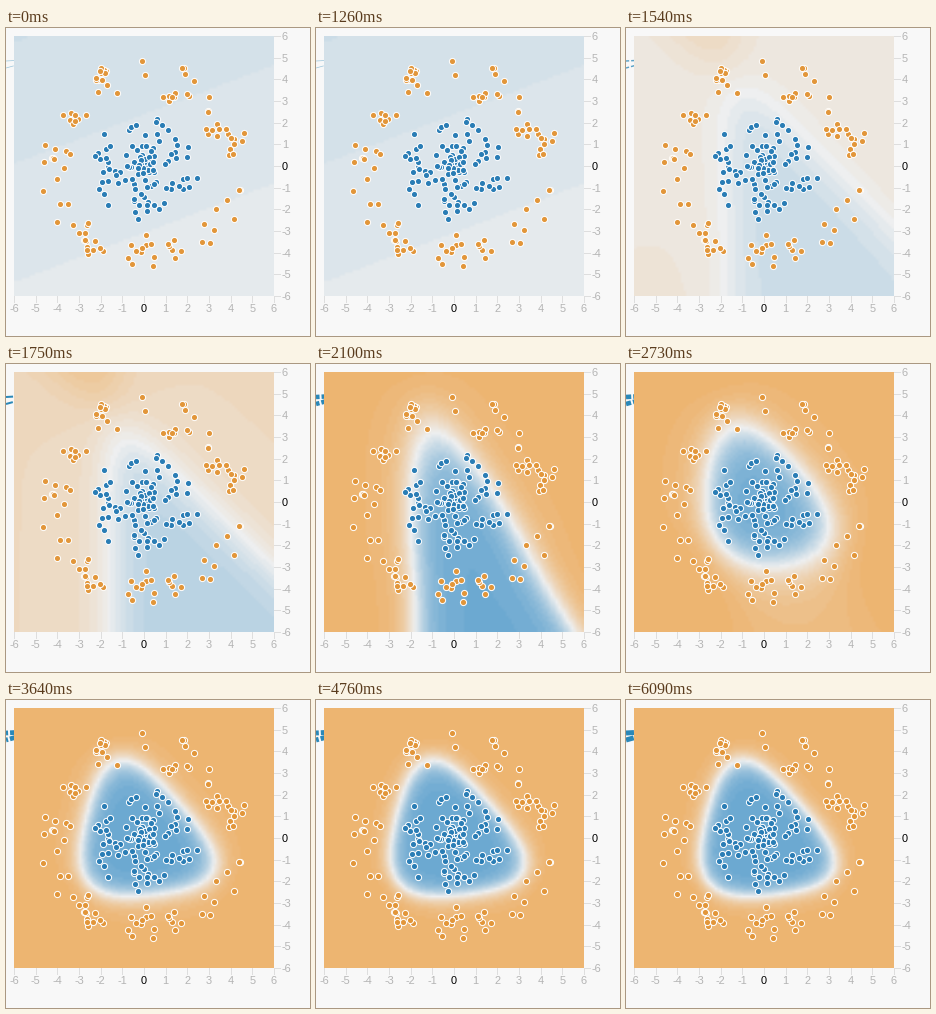
Write a matplotlib script that moves like this. It is 304 px wide and 308 px high and loops after 7.07 s.

```python
import numpy as np
import matplotlib.pyplot as plt
from matplotlib.animation import FuncAnimation

plt.rcParams["font.family"] = "Liberation Sans"
plt.rcParams["lines.scale_dashes"] = False

W, H, DPI = 304, 308, 80
PT = 72 / DPI  # points per pixel
FRAMES, STEP = 101, 70
LEFT = TOP = 8
SIDE = 260
RIGHT, BOTTOM = LEFT + SIDE, TOP + SIDE
UNIT = SIDE / 12
CENTRE = LEFT + SIDE / 2

ORANGE, PALE, BLUE = (237, 181, 113), (238, 239, 240), (108, 169, 209)
DOT_ORANGE, DOT_BLUE, LINK = "#e2963a", "#2a7db5", "#2a88b8"

# Training milestones in ms: start, first wedge, sharp wedge, closed blob, end.
START, WEDGE, SHARP, CLOSED, END = 1260, 1750, 2100, 2730, 5040

axis = (np.arange(100) + 0.5) * 0.12 - 6
X, Y = np.meshgrid(axis, -axis)
SHADES = np.array([
    np.interp(np.linspace(0, 1, 31), [0, 0.5, 1], channel)
    for channel in zip(ORANGE, PALE, BLUE)
]).T.astype(np.uint8)


def ramp(t, start, end, a=0, b=1):
    return np.interp(t, [start, end], [a, b])


def wall(degrees, distance, sharpness):
    """Hidden neuron: +1 inside a straight wall, -1 beyond it."""
    angle = np.radians(degrees)
    return np.tanh(sharpness * (X * np.cos(angle) + Y * np.sin(angle)
                                + distance))


def heatmap(t):
    """Three walls enclose the core; the floor joins after the two sides."""
    stages = [WEDGE, SHARP, CLOSED]
    sides = np.interp(t, [START, *stages[:2], END], [0, 0.4, 2.2, 3.2])
    floor = sides * ramp(t, 2030, 2900)
    sharpness = np.interp(t, [*stages, 3640], [0.8, 0.55, 0.5, 0.67])

    left = wall(ramp(t, SHARP, 3640, 0, -13),
                ramp(t, WEDGE, CLOSED, 1.55, 2.65), sharpness)
    right = wall(np.interp(t, stages, [226, 212, 221]),
                 np.interp(t, stages, [1.95, 1.7, 2.1]), sharpness)
    bottom = wall(96, 2.5, sharpness)

    untrained = 0.134 + 0.012 * (Y - 0.38 * X)
    total = (untrained * ramp(t, START, WEDGE, 1, 0)
             + sides * (left + right) + floor * bottom
             - 0.93 * (sides + floor))
    level = (np.tanh(total) + 1) / 2
    return SHADES[np.clip((level * 31).astype(int), 0, 30)]


def polar(rng, count, inner, outer):
    radius = rng.uniform(inner, outer, count)
    angle = rng.uniform(0, 2 * np.pi, count)
    return np.c_[radius * np.cos(angle), radius * np.sin(angle)]


def ring_points(rng):
    """Outer class: an even ring with a few crowded spots."""
    crowded = [(-2, 4.2), (2, 3.3), (3.4, 1.7), (-2.7, -3.6), (-4, 0.4),
               (-3.2, 2.2), (0, -3.75)]
    clumps = [rng.normal(spot, (0.45, 0.25), (8, 2)) for spot in crowded]
    return np.vstack([polar(rng, 54, 3.6, 4.9), *clumps])


def draw_dots(points, color):
    ax.scatter(CENTRE + points[:, 0] * UNIT, CENTRE - points[:, 1] * UNIT,
               s=(6.2 * PT) ** 2, c=color, edgecolors="white",
               linewidths=PT, zorder=3)


fig = plt.figure(figsize=(W / DPI, H / DPI), dpi=DPI, facecolor="#f8f8f8")
ax = fig.add_axes([0, 0, 1, 1])
ax.axis("off")

links = [ax.plot([0, 9], ys, color=LINK, zorder=1, dash_capstyle="butt")[0]
         for ys in ((33, 32.5), (40, 37.5))]
image = ax.imshow(heatmap(0), extent=(LEFT, RIGHT, BOTTOM, TOP),
                  interpolation="bilinear", aspect="auto", zorder=2)

rng = np.random.default_rng(7)
draw_dots(ring_points(rng), DOT_ORANGE)
draw_dots(polar(rng, 110, 0, 2.5), DOT_BLUE)

# Ticks and labels along the right and bottom edges.
tick = dict(color="#dedede", lw=PT, zorder=2.5)
for value in range(-6, 7):
    x, y = CENTRE + value * UNIT, CENTRE - value * UNIT
    ax.plot([RIGHT, RIGHT + 6], [y, y], **tick)
    ax.plot([x, x], [BOTTOM, BOTTOM + 6], **tick)
    style = dict(color="black" if value == 0 else "#b4b4b4",
                 fontsize=11 * PT, va="center_baseline")
    ax.text(RIGHT + 8, y, f"{value}", ha="left", **style)
    ax.text(x, BOTTOM + 12.5, f"{value}", ha="center", **style)

ax.set_xlim(0, W)
ax.set_ylim(H, 0)


def update(frame):
    t = frame * STEP
    image.set_data(heatmap(t))
    width = np.interp(t, [START, WEDGE, SHARP, END], [0.7, 2, 4.5, 5])
    travel = np.clip(t, START, END) - START
    for link in links:
        link.set_linewidth(width * PT)
        link.set_alpha(ramp(t, START, WEDGE, 0.45, 1))
        link.set_linestyle((-travel / 54 % 10 * PT, (8 * PT, 2 * PT)))
    return [image, *links]


anim = FuncAnimation(fig, update, frames=FRAMES, interval=STEP, repeat=True,
                     repeat_delay=0, blit=False)
plt.show()
```
